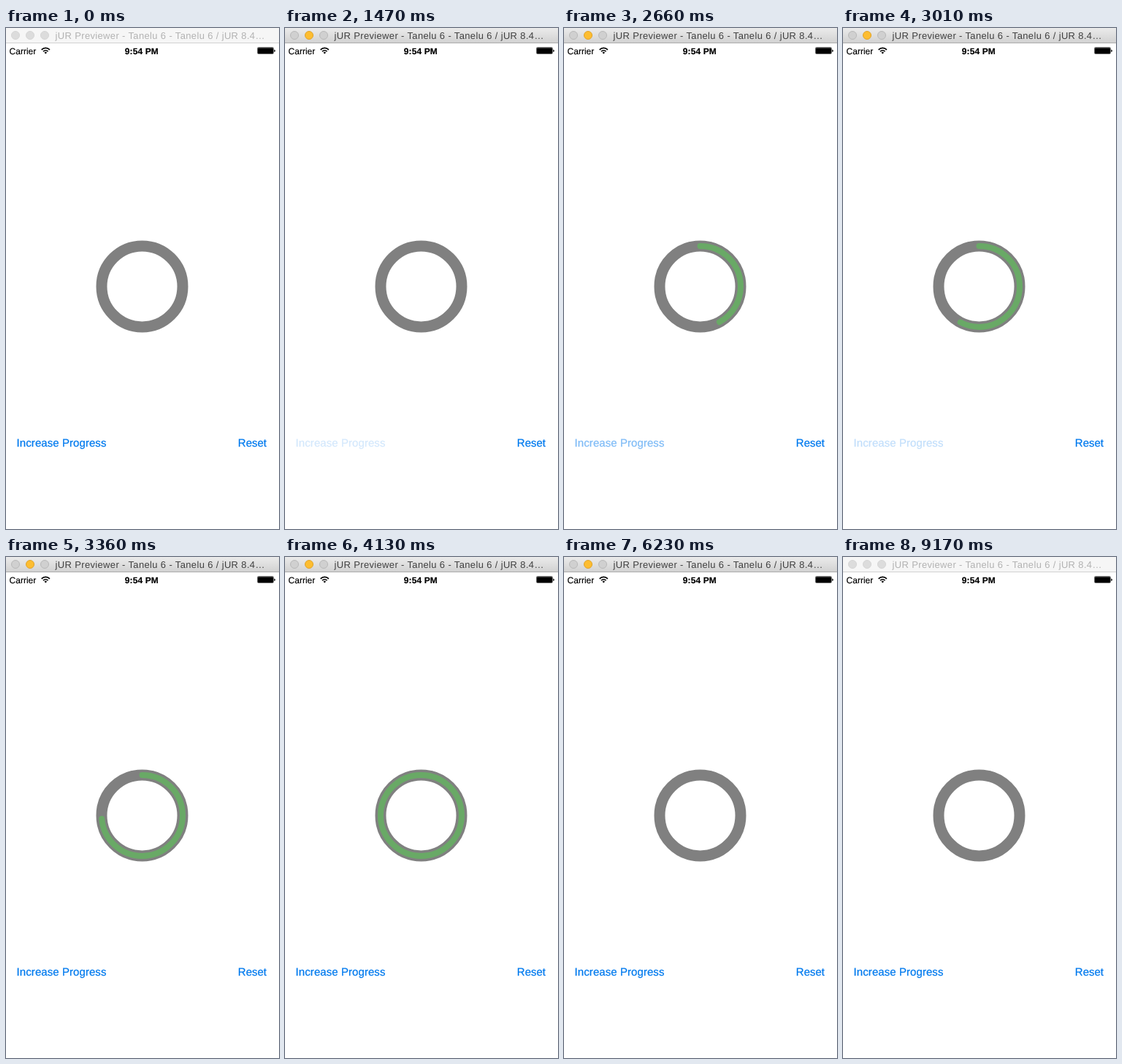
An HTML page for the animation above (9.31 s loop, 374x687 px).

```html
<!DOCTYPE html>
<html lang="en">
<head>
<meta charset="utf-8">
<title>Progress ring</title>
<style>
  html, body { margin: 0; width: 100%; height: 100%; overflow: hidden; background: #fff; }
  svg { display: block; }
  text {
    font-family: "Liberation Sans", Arial, sans-serif;
    text-rendering: geometricPrecision;
    white-space: pre;
  }
  .title { font-size: 13px; letter-spacing: .35px; fill: #404040; }
  .status { font-size: 12px; stroke: #000; stroke-width: .15; }
  .button { font-size: 15px; fill: #007aee; stroke: #007aee; stroke-width: .25; }
  .edge { stroke: #acacac; }
  .dot { fill: #d0d0d0; stroke: #b9b9b9; }
  .dot.amber { fill: #fdbd30; stroke: #e0a32a; }
  .idle .bar { fill: #f6f6f6; }
  .idle .edge { stroke: #d1d1d1; }
  .idle .dot { fill: #dcdcdc; stroke: #d5d5d5; }
  .idle .title { fill: #b2b2b2; }
</style>
</head>
<body>
<svg width="374" height="687" viewBox="0 0 374 687">
  <defs>
    <linearGradient id="chrome" x2="0" y2="1">
      <stop stop-color="#ebebeb"/>
      <stop offset="1" stop-color="#d2d2d2"/>
    </linearGradient>
  </defs>

  <g id="window" class="idle">
    <rect class="bar" width="374" height="20" fill="url(#chrome)"/>
    <path class="edge" d="M0 20.5H374"/>
    <circle class="dot" cx="13" cy="10" r="5.5"/>
    <circle class="dot amber" cx="33" cy="10" r="5.5"/>
    <circle class="dot" cx="53" cy="10" r="5.5"/>
    <text class="title" x="67.5" y="15">jUR Previewer - Tanelu 6 - Tanelu 6 / jUR 8.4…</text>
  </g>

  <text class="status" x="4.6" y="35.5">Carrier</text>
  <g fill="none" stroke="#000" stroke-width="1.8">
    <path d="M48.7 29.8A7.8 7.8 0 0 1 59.9 29.8"/>
    <path d="M51 32.2A4.7 4.7 0 0 1 57.6 32.2"/>
    <path d="M54.3 35.6L52.5 33.7A2.5 2.5 0 0 1 56.1 33.7Z" fill="#000" stroke="none"/>
  </g>
  <text class="status" x="162.8" y="35.5" font-weight="bold" letter-spacing=".1">9:54 PM</text>
  <rect x="344.5" y="26.5" width="22" height="9" rx="1.2" fill="#fff" stroke="#777"/>
  <rect x="345" y="27.2" width="21" height="7.8" rx=".5"/>
  <path d="M367.3 29.5Q368.8 29.8 368.8 31.3T367.3 33Z"/>

  <g fill="none" transform="rotate(-90 186.5 354.4)">
    <circle cx="186.5" cy="354.4" r="55.5" stroke="#808080" stroke-width="15"/>
    <circle id="arc" cx="186.5" cy="354.4" r="55.5" pathLength="1" stroke="#69a966"
            stroke-width="8" stroke-linecap="round" visibility="hidden"/>
  </g>

  <text id="increase" class="button" x="14.6" y="573.6" letter-spacing=".07">Increase Progress</text>
  <text id="reset" class="button" x="317.8" y="573.6">Reset</text>
</svg>

<script>
const LOOP = 9310, TICK = 70;
const ACTIVE = [1470, 9170];
const GROW = 600, SHRINK = 520, FADE = 300, DIM = 0.17;

// Each tap: time pressed, time released.
const TAPS = [[1470, 1500], [1950, 2030], [2450, 2540], [2900, 2985], [3440, 3530]];
const RESET = [[5600, 5700]];

const $ = id => document.getElementById(id);
const ramp = (t, start, length) => Math.min(1, Math.max(0, (t - start) / length));
const ease = x => x * x * (3 - 2 * x);

function buttonAlpha(t, taps) {
  const last = taps.filter(([down]) => t >= down).pop();
  return last ? DIM + (1 - DIM) * ramp(t, last[1], FADE) : 1;
}

function progress(t) {
  const grown = TAPS.reduce((sum, [, up]) => sum + ease(ramp(t, up, GROW)) / TAPS.length, 0);
  return grown * (1 - ease(ramp(t, RESET[0][1], SHRINK)));
}

function draw(t) {
  const p = progress(t);
  $("window").setAttribute("class", t >= ACTIVE[0] && t < ACTIVE[1] ? "" : "idle");
  $("arc").setAttribute("visibility", p > 0.0005 ? "visible" : "hidden");
  $("arc").setAttribute("stroke-dasharray", p > 0.9995 ? "none" : `${p} 2`);
  $("increase").setAttribute("opacity", buttonAlpha(t, TAPS));
  $("reset").setAttribute("opacity", buttonAlpha(t, RESET));
}

const start = performance.now();
function frame() {
  const t = (performance.now() - start) % LOOP;
  draw(Math.floor(t / TICK) * TICK);
  requestAnimationFrame(frame);
}
frame();
</script>
</body>
</html>
```
